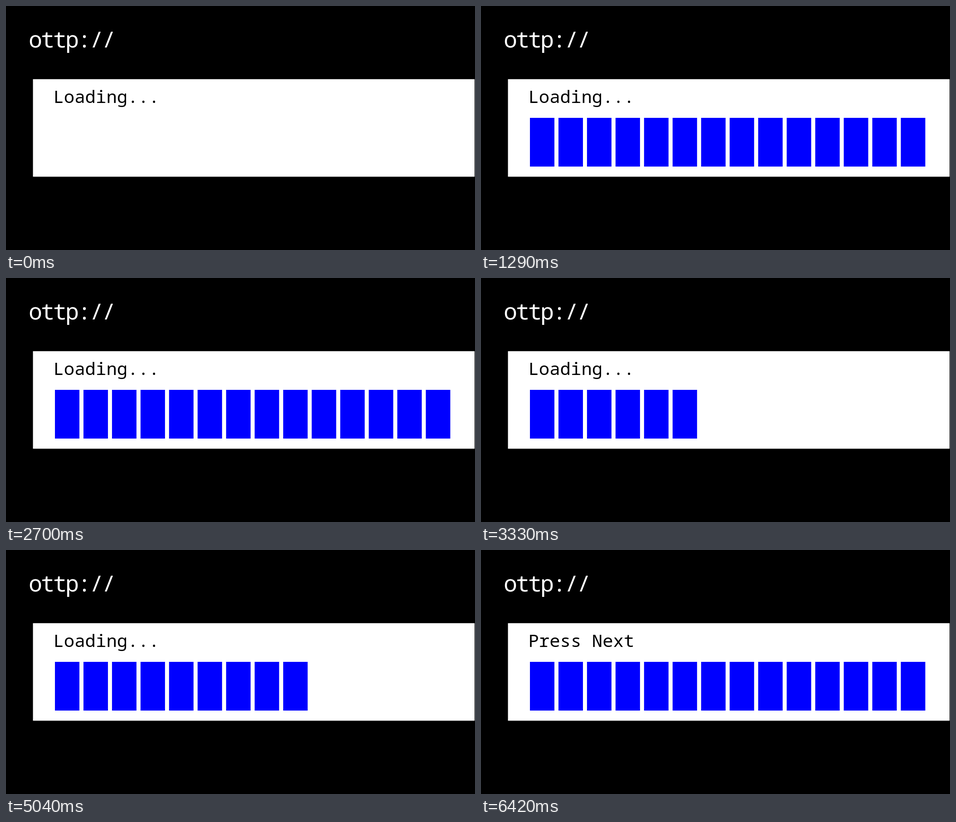
Write an HTML page that moves like this. It is 1035 px wide and 541 px high and loops after 9150 ms.

```html
<!DOCTYPE html>
<html lang="en">
<head>
<meta charset="utf-8">
<title>Loading</title>
<style>
  html, body { margin: 0; width: 100%; height: 100%; overflow: hidden; background: #000; }
  svg { display: block; width: 1035px; height: 541px; }
  text { font: 39px "Noto Sans Mono", "DejaVu Sans Mono", monospace; }
  .brand { font-size: 50px; font-weight: 500; letter-spacing: -3px; fill: #fff; }
</style>
</head>
<body>
<svg viewBox="0 0 1035 541">
  <text class="brand" x="50" y="92">ottp://</text>
  <path fill="#fff" d="M59.5 162.3H1034V378.5H59.5Z"/>
  <text id="loading" x="104.4" y="215">Loading...</text>
  <text id="next" x="104.4" y="215">Press Next</text>
  <g id="bars" fill="#00f"></g>
</svg>
<script>
const LOOP = 9150, TICK = 30, BAR_COUNT = 14, LAST_STEP = 55;

// [step, tick] keys; the steps between them are evenly spaced.
const STEP_KEYS = [
  [0, 1], [9, 30], [10, 34], [13, 43], [14, 47], [19, 64], [21, 70],
  [29, 97], [30, 101], [33, 111], [34, 114], [39, 130], [40, 134],
  [42, 141], [43, 145], [49, 164], [50, 168], [LAST_STEP, 185]
];

const loading = document.getElementById("loading");
const next = document.getElementById("next");
const bars = Array.from({ length: BAR_COUNT }, (_, i) => {
  const bar = document.createElementNS("http://www.w3.org/2000/svg", "rect");
  const box = { x: 108 + 62.96 * i, y: 248, width: 54, height: 108 };
  for (const name in box) bar.setAttribute(name, box[name]);
  return document.getElementById("bars").appendChild(bar);
});

function stepTick(step) {
  const i = Math.max(1, STEP_KEYS.findIndex(([s]) => s >= step));
  const [s0, t0] = STEP_KEYS[i - 1], [s1, t1] = STEP_KEYS[i];
  return Math.round(t0 + (t1 - t0) * (step - s0) / (s1 - s0));
}

const stepTicks = Array.from({ length: LAST_STEP + 1 }, (_, step) => stepTick(step));

const progress = (tick, start, end) =>
  Math.min(1, Math.max(0, (tick - start) / (end - start)));

function draw(time) {
  const tick = Math.floor((time % LOOP) / TICK);
  const steps = stepTicks.filter(t => t <= tick).length;
  const visible = steps ? (steps - 1) % BAR_COUNT + 1 : 0;
  bars.forEach((bar, i) => bar.setAttribute("visibility", i < visible ? "visible" : "hidden"));
  loading.setAttribute("opacity", 1 - progress(tick, 183, 191));
  next.setAttribute("opacity", progress(tick, 192, 214));
}

const start = performance.now();
function frame() {
  draw(performance.now() - start);
  requestAnimationFrame(frame);
}
frame();
</script>
</body>
</html>
```
